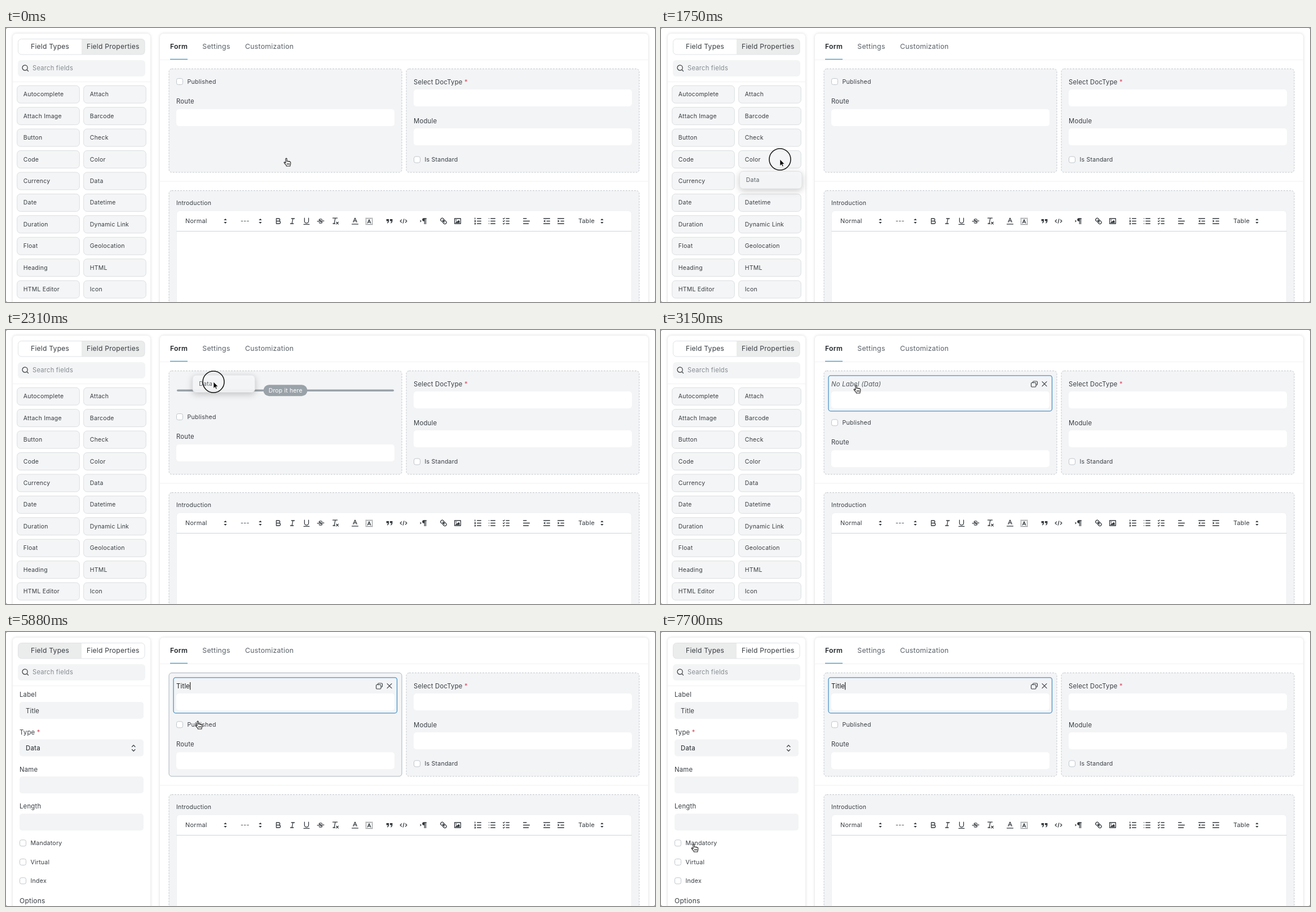
Animation, 1151 px wide and 486 px high, one loop 8000 ms. Source, as an HTML page:

```html
<!DOCTYPE html>
<html lang="en">
<head>
<meta charset="utf-8">
<title>Form builder</title>
<style>
  html, body { margin: 0; width: 100%; height: 100%; overflow: hidden; background: #fff; }
  svg { display: block; width: 100%; height: 100%; }
  text { font-family: Inter, "Open Sans", sans-serif; letter-spacing: .02em; fill: #383d42; white-space: pre; }
  .panel { fill: #fff; filter: drop-shadow(0 0 2.5px rgba(0, 0, 0, .15)); }
  .rule { stroke: #f0f1f2; }
  .chip { fill: #f4f5f6; stroke: #dadee1; }
  .column { fill: #f3f4f6; stroke: #c3c8cd; stroke-dasharray: 3 2; }
  .column.hover { stroke: #aab4bd; stroke-dasharray: none; }
  .input { fill: #fff; }
  .well { fill: #f3f4f5; }
  .check { fill: #fff; stroke: #c0c6cb; }
  .icon { fill: none; stroke: #33383c; stroke-width: 1.4; stroke-linecap: round; stroke-linejoin: round; }
  .solid { fill: #33383c; stroke: none; }
</style>
</head>
<body>
<svg id="stage" viewBox="0 0 1151 486" xmlns="http://www.w3.org/2000/svg"></svg>
<script>
const LOOP = 8000, STEP = 70;
const stage = document.getElementById('stage');

const text = (x, y, s, size = 10.5, extra = '') =>
  `<text x="${x}" y="${y}" font-size="${size}" ${extra}>${s}</text>`;
const box = (x, y, w, h, cls, r = 5, extra = '') =>
  `<rect x="${x}" y="${y}" width="${w}" height="${h}" rx="${r}" class="${cls}" ${extra}/>`;
const line = (x1, y1, x2, y2) => `<path class="rule" d="M${x1} ${y1}L${x2} ${y2}"/>`;
const group = (id, body, extra = '') => `<g id="${id}" ${extra}>${body}</g>`;
const label = (x, y, s, required) =>
  text(x, y, s + (required ? ' <tspan fill="#d9485f">*</tspan>' : ''), 11.3);
const check = (x, y, s) =>
  box(x + .5, y - 5.5, 11, 11, 'check', 3) + text(x + 19.5, y + 3.9, s, 10.6);

// Toolbar icons live on an 18 x 18 grid.
const icon = (x, d, solid = '') =>
  `<g class="icon" transform="translate(${x - 8.1} 334.4) scale(.9)">
    <path d="${d}"/><path class="solid" d="${solid}"/></g>`;
const sorter = x => icon(x, '', 'M6 7.2 9 4l3 3.2ZM6 10.8 9 14l3-3.2Z');

function toolbar() {
  const dots = [4, 9, 14];
  const rows = start => dots.map(y => `M${start} ${y}H15`).join('');
  return text(318, 346.3, 'Normal', 10.9) + sorter(389) +
    text(416, 346.3, '---', 10.9) + sorter(451) +
    icon(483, 'M5 4H9.5a2.5 2.5 0 0 1 0 5H5ZM5 9h5.5a2.5 2.5 0 0 1 0 5H5Z') +
    icon(508, 'M7 4h6M5 14h6M8 14 10 4') +
    icon(533, 'M5 3V9a4 4 0 0 0 8 0V3M3.5 15.5h11') +
    icon(558, 'M2.5 9.3 15.5 8.7M12 6.3C11.7 5.6 10.6 5 9 5 7.3 5 6 5.8 6 6.5c0 1 .5 1.3 3 1.5M6 11.7c.3.7 1.4 1.3 3 1.3 1.7 0 3-.8 3-1.5 0-1-.5-1.3-3-1.5') +
    icon(584, 'M4 3h9M9 3 7 13M4.5 14h4M11 11l4 4M15 11l-4 4') +
    icon(619, 'M5.5 11 9 3l3.5 8M6.6 8.5h4.8M3 15h12') +
    icon(644, 'M6 13 9 6l3 7M7 11h4') +
    box(638.5, 337.5, 11, 11, 'icon', 0, 'style="stroke-width:1.3;stroke-dasharray:.1 2.1"') +
    icon(680, '', 'M3 5h5v4q0 3-3 4.5l-.8-1Q6 11 6 9H3ZM10 5h5v4q0 3-3 4.5l-.8-1Q13 11 13 9h-3Z') +
    icon(705, 'M5 6.5 2.5 9 5 11.5M13 6.5 15.5 9 13 11.5M10 5 8 13') +
    icon(740, 'M15 4H11M11.5 4V14.5M14 4V14.5', 'M3 6.5v5L5.5 9ZM11.5 3.3H10a3 3 0 0 0 0 6h1.5Z') +
    icon(776, 'M7 7l4 4M8.9 4.6a3.4 3.4 0 0 1 .3 4.7 3.4 3.4 0 0 1-4.6-.4C3.2 7.5 2 6.4 4.2 4.2s3.3-1 4.7.4ZM13.4 9.1a3.4 3.4 0 0 0-4.7-.4 3.4 3.4 0 0 0 .4 4.7c1.4 1.4 2.5 2.5 4.7.4s1-3.3-.4-4.7Z') +
    icon(801, 'M3 4h12v10H3Z', 'M5 12.5V11l2-2 1 1 3-3 2 2v3.5ZM5 6h2v2H5Z') +
    icon(837, rows(7.5) + 'M3.2 2.8V5M2.6 8H4V9L2.6 10H4M2.6 13H4V15H2.6') +
    icon(862, rows(6.5) + dots.map(y => `M3 ${y}h.1`).join('')) +
    icon(887, rows(9) + dots.map(y => `M3 ${y}l1 1 2-2`).join('')) +
    icon(923, 'M3 4H9M3 9H15M3 14H13') +
    icon(959, 'M3 4H15M9 9h6M3 14H15', 'M6 6.5v5L2.5 9Z') +
    icon(984, 'M3 4H15M9 9h6M3 14H15', 'M3 6.5v5L6.5 9Z') +
    text(1015, 346.3, 'Table', 10.9) + sorter(1057);
}

const types = ['Autocomplete', 'Attach', 'Attach Image', 'Barcode', 'Button', 'Check', 'Code',
  'Color', 'Currency', 'Data', 'Date', 'Datetime', 'Duration', 'Dynamic Link', 'Float',
  'Geolocation', 'Heading', 'HTML', 'HTML Editor', 'Icon'];

const typeChips = types.map((name, i) => {
  const x = 20 + i % 2 * 118, y = 102.2 + Math.floor(i / 2) * 38.43;
  return group('type' + i, box(x - .3, y, 110.6, 31, 'chip', 6) + text(x + 10.8, y + 19.1, name));
}).join('');

const properties =
  label(24, 115.3, 'Label') + box(24, 124, 220, 30, 'well') + text(35, 143.6, '', 11.3, 'id="sideLabel"') +
  label(24, 181.5, 'Type', true) + box(24, 190.5, 220, 30, 'well') +
  text(35, 209.8, 'Data', 11.3, 'font-weight="500"') +
  '<path class="icon" stroke-width="1.2" style="stroke-width:1.2" d="M223.5 203.5l2.7-2.8 2.7 2.8M223.5 208.5l2.7 2.8 2.7-2.8"/>' +
  label(24, 247.5, 'Name') + box(24, 256.3, 220, 30, 'well') +
  label(24, 313.4, 'Length') + box(24, 322.3, 220, 30, 'well') +
  check(24, 374.3, 'Mandatory') + check(24, 408, 'Virtual') + check(24, 441.3, 'Index') +
  text(24, 480.5, 'Options', 12);

const sidebar =
  box(12, 10, 244, 500, 'panel', 6) +
  '<path id="idleTab" fill="#ebecec"/>' +
  box(21.5, 19.5, 224.5, 27.5, '', 6, 'fill="none" stroke="#e0e2e4"') +
  text(44, 37.4, 'Field Types', 12.1) + text(143, 37.4, 'Field Properties', 12.1) +
  box(21, 57, 226, 29, 'well', 6) +
  '<path class="icon" style="stroke-width:1.2" d="M38.2 70.5a4.6 4.6 0 1 1-9.2 0a4.6 4.6 0 0 1 9.2 0M37 74l2.6 2.6"/>' +
  text(47, 75.4, 'Search fields', 11.2, 'style="fill:#858b91"') +
  line(12, 95.5, 256, 95.5) +
  group('typeList', typeChips) + group('propertyList', properties);

const newField =
  box(302, 109, 387, 30, 'input') +
  text(302, 99.6, 'No Label (Data)', 11.3, 'id="placeholder" font-style="italic" style="fill:#50575d"') +
  text(302, 99.6, '', 11.3, 'id="title" style="fill:#17191b"') +
  '<path id="caret" d="M0 89V102.500" stroke="#111" stroke-width="1.100"/>' +
  group('fieldFrame', box(297, 80.8, 396.5, 63, '', 4, 'fill="none" stroke="#4a94c8" stroke-width="1.3"') +
    '<path class="icon" style="stroke-width:1.1" d="M659.5 93.500V92.500a1.500 1.500 0 0 1 1.500-1.500H666a1.500 1.500 0 0 1 1.500 1.500V96a1.500 1.500 0 0 1-1.500 1.500H665M658 93.500H663.500a1.500 1.500 0 0 1 1.500 1.500V99.500a1.500 1.500 0 0 1-1.500 1.500H658a1.500 1.500 0 0 1-1.500-1.500V95a1.500 1.500 0 0 1 1.500-1.500ZM676 91.700l8 8M684 91.700l-8 8"/>');

const dropHint =
  box(303, 105.6, 385, 3.4, '', 1.7, 'fill="#9aa2a9"') +
  box(456.500, 97.300, 78, 20, '', 10, 'fill="#9aa2a9"') +
  text(465.700, 111, 'Drop it here', 10.4, 'style="fill:#fff"');

const form =
  box(273, 10, 866, 500, 'panel', 6) +
  text(291, 37.400, 'Form', 12.2, 'font-weight="600" style="fill:#1f2428"') +
  text(348.300, 37.400, 'Settings', 12.3, 'style="fill:#5a6067"') +
  text(424, 37.400, 'Customization', 12.3, 'style="fill:#5a6067"') +
  line(273, 56.500, 1139, 56.500) +
  '<path d="M291 55.500H322" stroke="#62a5c9" stroke-width="1.600"/>' +
  box(289, 72.500, 413, 183.500, 'column', 5, 'id="leftColumn"') +
  box(710, 72.500, 413, 183.500, 'column') +
  group('fields', check(302, 95, 'Published') + label(302, 134, 'Route') + box(302, 144, 387, 30, 'input')) +
  label(723, 99.600, 'Select DocType', true) + box(723, 109, 387, 30, 'input') +
  label(723, 168.800, 'Module') + box(723, 178, 387, 30, 'input') +
  check(723, 233.500, 'Is Standard') +
  line(273, 272, 1139, 272) +
  box(289, 288.500, 834, 230, 'column') +
  text(302, 314, 'Introduction') +
  box(302.500, 324, 807, 190, 'input', 6, 'stroke="#e9ebed" stroke-width=".7"') +
  '<path d="M302.500 360.500H1109.500" stroke="#cfd3d7"/>' +
  toolbar() +
  box(273.500, 56.500, 865.500, 215.500, '', 3, 'id="sectionFrame" fill="none" stroke="#a9c4d8"') +
  group('newField', newField) + group('dropHint', dropHint);

const dragged = group('dragged',
  box(0, 0, 110.500, 30.500, '', 6, 'fill="#f6f7f8" fill-opacity=".93" stroke="#dfe2e4" style="filter:drop-shadow(0 3px 6px rgba(0,0,0,.22))"') +
  text(11.300, 18.900, 'Data', 10.500, 'style="fill:#595f65"'));

const pointers =
  group('press', '<circle r="19" fill="none" stroke="#111" stroke-width="1.500"/>' +
    '<path d="M0 0V11.500L2.700 9 4.400 12.800 6.200 12 4.500 8.300H8Z" fill="#000" stroke="#fff" stroke-width=".7"/>') +
  group('hand', '<path transform="translate(-7 -7.500)" fill="#fff" stroke="#222" stroke-width="1.100" stroke-linejoin="round" ' +
    'd="M4 9V1.700a1.100 1.100 0 0 1 2.200 0V6.300q.2-1 1.300-.8 1 .1 1.100 1 .2-.8 1.200-.6 .9.2.9 1 .3-.6 1.100-.4.9.3.9 1.200V10.500q0 1.500-.8 2.500V14.500H5.300V13.400Q3.800 11.800 1.300 8.700c-.6-.9.6-1.800 1.400-1.100ZM6.700 9.500v2.500M8.600 9.500v2.500M10.500 9.500v2.500"/>');

stage.innerHTML = '<rect width="1151" height="486" fill="#8b8b8b"/>' +
  box(0, 0, 1151, 486, 'input', 3) + sidebar + form + dragged + pointers;

const el = {};
stage.querySelectorAll('[id]').forEach(node => el[node.id] = node);
const show = (id, on) => el[id].setAttribute('visibility', on ? 'inherit' : 'hidden');
const move = (id, x, y) => el[id].setAttribute('transform', `translate(${x} ${y})`);

// Pointer keys: time, x, y.
const handPath = [[0, 499, 238], [70, 496, 239], [350, 280, 264], [560, 92, 262], [700, 150, 246],
  [840, 196, 233], [1120, 192, 309], [1330, 184, 300], [1540, 176, 269], [2590, 368, 99],
  [2660, 368, 104], [2870, 357, 194], [3150, 348, 105], [5670, 348, 107], [5880, 342, 165],
  [6160, 338, 129], [6650, 338, 129], [6860, 200, 270], [7000, 92, 385], [7140, 80, 406],
  [7350, 80, 406], [7700, 60, 383]];
const dragPath = [[1750, 211, 233], [1960, 300, 150], [2100, 345, 108], [2310, 368, 92]];
const typing = [[4270, 'T'], [4480, 'Ti'], [4620, 'Tit'], [4900, 'Titl'], [5390, 'Title']];

function along(path, t) {
  const next = path.findIndex(key => key[0] > t);
  if (next < 0) return path.at(-1).slice(1);
  if (next === 0) return path[0].slice(1);
  const [a, b] = [path[next - 1], path[next]];
  const k = (t - a[0]) / (b[0] - a[0]);
  return [a[1] + (b[1] - a[1]) * k, a[2] + (b[2] - a[2]) * k];
}

function render(t) {
  const within = (from, to) => t >= from && t < to;
  const editing = t >= 3570, dropped = t >= 2450;
  const [hx, hy] = along(handPath, t), [px, py] = along(dragPath, t);

  show('typeList', !editing);
  show('propertyList', editing);
  el.idleTab.setAttribute('d', editing
    ? 'M134 20H27q-5 0-5 5V42q0 5 5 5H134Z' : 'M134 20H241q5 0 5 5V42q0 5-5 5H134Z');

  move('fields', 0, dropped ? 69.3 : t >= 2100 ? 59 : 0);
  show('dropHint', within(2100, 2450));
  show('newField', dropped);
  show('fieldFrame', t >= 2660);
  show('placeholder', dropped && !editing);
  show('sectionFrame', (t < 840 || t > 6370) && hx > 270 && hx < 292);
  el.leftColumn.classList.toggle('hover', within(5810, 6020));

  const typed = typing.filter(([at]) => t >= at).at(-1)?.[1] ?? '';
  el.title.textContent = el.sideLabel.textContent = typed;
  move('caret', 302.5 + (typed ? el.title.getComputedTextLength() : 0), 0);
  show('caret', within(3570, 4130) || within(4270, 5950) || within(6440, 7000) || t >= 7490);

  const pressing = within(1750, 2660);
  show('press', pressing);
  move('press', px, py);
  show('dragged', within(1750, 2450));
  if (t < 1820) move('dragged', 139.5, 254.5);
  else move('dragged', px - 37, py - 12);
  show('type9', !within(1750, 1820));
  show('hand', !pressing && !within(4270, 5670));
  move('hand', hx, hy);
}

const start = performance.now();
function tick() {
  const t = (performance.now() - start) % LOOP;
  render(Math.floor(t / STEP) * STEP);
  requestAnimationFrame(tick);
}
tick();
</script>
</body>
</html>
```
